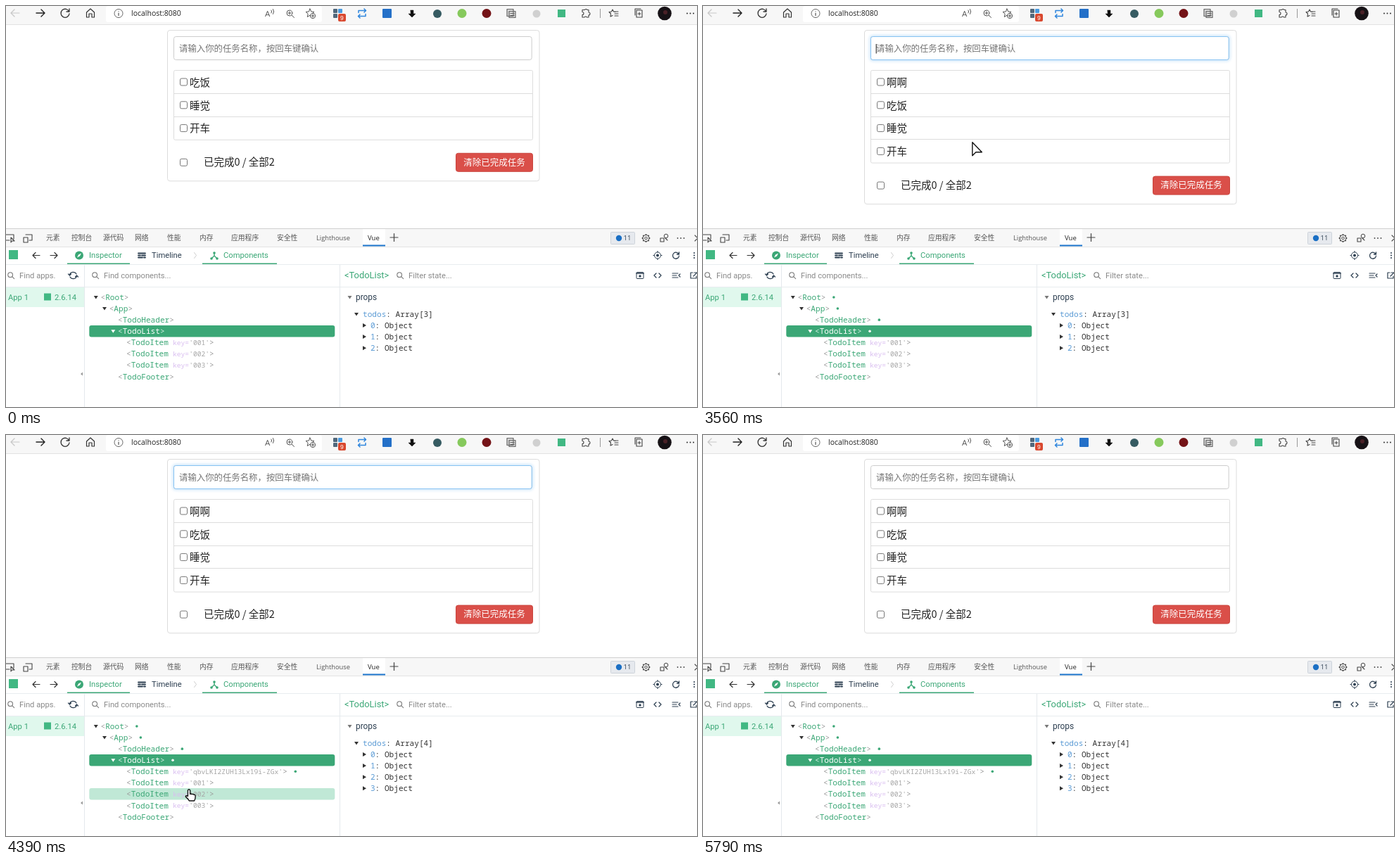
These frames come from a looping animation (982x570 px, 5870 ms). An HTML page:

```html
<!DOCTYPE html>
<html lang="zh">
<head>
<meta charset="utf-8">
<title>Todo list</title>
<style>
html,body{margin:0;width:100%;height:100%;overflow:hidden;background:#fff}
svg{display:block;width:982px;height:570px}
text{white-space:pre}
.cjk{font-family:"Noto Sans CJK SC","Noto Sans CJK",sans-serif}
.ui{font-family:"Open Sans","Noto Sans",sans-serif}
.rob{font-family:Roboto,sans-serif}
.mono{font-family:"Noto Sans Mono","DejaVu Sans Mono",monospace}
.lib{font-family:"Liberation Mono",monospace}
.sans{font-family:"Liberation Sans",sans-serif}
</style>
</head>
<body>
<svg id="stage" viewBox="0 0 982 570">
<defs><filter id="blur" x="-5%" y="-50%" width="110%" height="200%"><feGaussianBlur stdDeviation="2"/></filter></defs>
<g id="base"></g><g id="page"></g><g id="tree"></g><g id="over"></g><g id="pointer"></g>
</svg>
<script>
const LOOP = 5870, GREEN = '#3ba776', INK = '#2c3e50';
const $ = id => document.getElementById(id);
const esc = s => s.replace(/&/g, '&amp;').replace(/</g, '&lt;');

// y is the middle of the capitals
const text = (x, y, s, size, fill = '#222', font = 'cjk', more = '') =>
  `<text x="${x}" y="${y + size * .365}" font-size="${size}" fill="${fill}" class="${font}" ${more}>${esc(s)}</text>`;
const rect = (x, y, w, h, fill, stroke = 'none', r = 0, more = '') =>
  `<rect x="${x}" y="${y}" width="${w}" height="${h}" fill="${fill}" stroke="${stroke}" rx="${r}" ${more}/>`;
const dot = (x, y, r, fill, stroke = 'none') =>
  `<circle cx="${x}" cy="${y}" r="${r}" fill="${fill}" stroke="${stroke}"/>`;
const icon = (x, y, d, color = '#444', w = 1.2, fill = 'none') =>
  `<path transform="translate(${x} ${y})" d="${d}" fill="${fill}" stroke="${color}" stroke-width="${w}" stroke-linecap="round" stroke-linejoin="round"/>`;
const hline = (x, y, w, c) => rect(x, y, w, 1, c);
const down = (x, y, c) => icon(x, y, 'M-3 -2H3L0 2.5Z', 'none', 0, c);
const right = (x, y, c) => icon(x, y, 'M-2 -3V3L3 0Z', 'none', 0, c);

const ARROW_L = 'M6 0H-6M-1 -5L-6 0L-1 5', ARROW_R = 'M-6 0H6M1 -5L6 0L1 5';
const RELOAD = 'M5.6 -2A6 6 0 1 0 6 1M6 -6V-2H2';
const LENS = 'M3 -1A4 4 0 1 1 -5 -1A4 4 0 1 1 3 -1M2 2L5.5 5.5';
const STAR = 'M0 -6L1.8 -2L6 -1.6L2.8 1.2L3.7 5.5L0 3.2L-3.7 5.5L-2.8 1.2L-6 -1.6L-1.8 -2Z';
const scale = (s, x, y, html) => `<g transform="translate(${x} ${y}) scale(${s})">${html}</g>`;

function browserBar() {
  return rect(0, 0, 982, 26, '#f7f7f7') + rect(142, 0, 307, 23, '#fff', 'none', 3) + hline(0, 26, 982, '#e2e2e2') +
    icon(13, 10, ARROW_L, '#c8c8c8') + icon(49, 10, ARROW_R, '#222', 1.4) +
    icon(84, 10, RELOAD, '#333', 1.3) +
    icon(120, 10, 'M-5.5 -1L0 -6L5.5 -1V6H2V1H-2V6H-5.5Z', '#333') +
    dot(160, 10.5, 6, 'none', '#666') + icon(160, 10, 'M0 0V3.5M0 -2.5V-2.4', '#555') +
    text(178, 10.5, 'localhost:8080', 10.5, '#222', 'ui') +
    text(368, 11, 'A', 11.5, '#555', 'ui') + icon(377, 8, 'M0 -2Q1.5 0 0 2M2.5 -3.5Q5 0 2.5 3.5', '#555', 1) +
    icon(404, 11, LENS + 'M-3 -1H1M-1 -3V1', '#555', 1) +
    icon(432, 10, STAR, '#555', 1) + dot(436, 14, 3.6, '#fff', '#555') + icon(436, 14, 'M-2 0H2M0 -2V2', '#555', 1) +
    rect(465, 4, 6, 6, '#51687c', 'none', 1) + rect(472, 4, 6, 6, '#4a9be0', 'none', 1) + rect(465, 11, 6, 6, '#51687c', 'none', 1) +
    rect(472, 11, 11, 11, '#d9482f', 'none', 2) + text(475, 16.7, '9', 8.5, '#fff', 'sans') +
    icon(506, 10.5, 'M-5 -1V-4H5M3 -6.5L5.5 -4L3 -1.5M5 1V4H-5M-3 6.5L-5.5 4L-3 1.5', '#2f86dd', 1.5) +
    rect(535, 4, 13, 13, '#2470c8', 'none', 1) +
    icon(577, 11, 'M-2 -5H2V0H5L0 5L-5 0H-2Z', '#111', .5, '#111') +
    dot(613, 11, 6, '#365b62') + dot(648, 10.5, 6.5, '#86c95c') + dot(683, 10.5, 6.5, '#741317') +
    icon(718, 10.5, 'M-6 -6H3V4H-6ZM-3 -3H6V6H-3ZM-1 0H4M-1 3H4', '#666', 1.2, '#d8d8d8') +
    dot(754, 11, 5.5, '#d0d0d0') + rect(784, 5, 11, 11, '#41b883') +
    icon(824, 10.5, 'M-5 -5H-1.5A2 2 0 0 1 2 -5H4V-1.5A2 2 0 0 1 4 2.5V5.5H1.5A2 2 0 0 0 -2 5.5H-5V2A2 2 0 0 0 -5 -2Z', '#444', 1.1) +
    rect(844, 4, 1, 13, '#999') +
    icon(863, 10, 'M-1 -5L.5 -2L3 -1.6M-1 -5L-2.5 -2L-6 -1.5L-3.5 1L-4 5L-1 3.4M2 1H7M1 -2H7M2 4H7', '#444', 1.1) +
    icon(899, 10, 'M-5 3V-6H3M-3 -4H5V6H-3ZM-1 1H3M1 -1V3', '#444', 1.1) +
    dot(936, 10.5, 9.8, '#171216') + dot(937, 9, 3, '#4a2027') +
    [968, 972.5, 977].map(x => dot(x, 10.5, 1, '#333')).join('');
}

function devtoolsBar() {
  const tabs = [[57, '元素'], [93, '控制台'], [138, '源代码'], [183, '网络'], [229, '性能'], [275, '内存'], [320, '应用程序'], [385, '安全性']];
  return rect(0, 316, 982, 26, '#f7f7f7') + hline(0, 316, 982, '#d0d0d0') +
    icon(5, 329, 'M-6 -4H6V2M-6 4H0M2 0L7 5H3.5L2 7Z', '#444', 1.1) +
    icon(31, 330, 'M-3 -5H6V3H2M-6 -1H0V6H-6Z', '#444', 1.1) +
    tabs.map(([x, s]) => text(x, 329.5, s, 9.8, '#555')).join('') +
    text(441, 329.5, 'Lighthouse', 9.3, '#555', 'ui') +
    rect(507, 317, 32, 25, '#fff') + rect(507, 339.5, 32, 2, '#1a73c9') + text(514, 329.5, 'Vue', 9.5, '#222', 'ui') +
    icon(551.5, 329, 'M-5.5 0H5.5M0 -5.5V5.5', '#444') +
    rect(859.5, 321.5, 34, 17, '#e6e9ee', '#cdd3da', 1) + dot(871, 330, 4.2, '#1a6fc4') + text(877.5, 330, '11', 9.5, '#345', 'ui') +
    dot(909.5, 330, 4.5, 'none', '#444') + dot(909.5, 330, 1.8, 'none', '#444') +
    Array.from({length: 8}, (_, i) => `<path d="M909.5 324.2V325.8" stroke="#444" stroke-width="1.8" transform="rotate(${i * 45} 909.5 330)"/>`).join('') +
    dot(938, 327, 2.8, 'none', '#444') + icon(934, 331, 'M-4 -1H1V4H-4ZM3 -1L6 2', '#444', 1.1) +
    [954.5, 959, 963.5].map(x => dot(x, 330, .9, '#444')).join('') +
    icon(981, 330, 'M-2 -4L2 0L-2 4', '#444', 1.1);
}

function vueBar() {
  return hline(0, 342, 982, '#e4e4e4') + rect(4, 347, 13, 13, '#41b883') +
    icon(43, 354.5, 'M5 0H-5M-1 -4L-5 0L-1 4', '#333') + icon(68, 354.5, 'M-5 0H5M1 -4L5 0L1 4', '#333') +
    dot(104, 354.5, 6, GREEN) + icon(104, 354.5, 'M3 -3L1 1L-3 3L-1 -1Z', 'none', 0, '#fff') +
    text(118, 354, 'Inspector', 11.2, GREEN, 'rob') +
    icon(193, 354.5, 'M-5 -3H5M-5 0H-2M0 0H5M-5 3H1M3 3H5', INK, 1.8) + text(207, 354, 'Timeline', 11.2, INK, 'rob') +
    icon(269, 354.5, 'M-1.5 -4L1.5 0L-1.5 4', '#ccc', 1) +
    icon(296, 355, 'M0 -4V0L-4 4M0 0L4 4', GREEN, 1.4) + dot(296, 351, 1.8, GREEN) + dot(292, 359, 1.8, GREEN) + dot(300, 359, 1.8, GREEN) +
    text(309, 354, 'Components', 11.2, GREEN, 'rob') +
    hline(0, 367, 982, '#e8ecef') + rect(87, 365.5, 89, 1.5, GREEN) + rect(279, 365.5, 106, 1.5, GREEN) +
    dot(926, 354.5, 4.5, 'none', INK) + dot(926, 354.5, 2, INK) + icon(926, 354.5, 'M-6 0H-5M5 0H6M0 -6V-5M0 5V6', INK) +
    scale(.75, 952, 354.5, icon(0, 0, RELOAD, INK, 1.7)) +
    [351, 354.5, 358].map(y => dot(978, y, 1, INK)).join('');
}

function panels() {
  const lens = x => scale(.85, x, 383, icon(0, 0, LENS, '#777', 1.2));
  return lens(7) + text(19, 383, 'Find apps.', 11.2, '#8a8a8a', 'rob') +
    icon(95.5, 383, 'M-5 -1A5 4.5 0 0 1 4.5 -2M5 1A5 4.5 0 0 1 -4.5 2M-7 -2L-5 0L-3 -2M7 2L5 0L3 2', INK, 1.2) +
    lens(127) + text(139, 383, 'Find components...', 11.2, '#8a8a8a', 'rob') +
    text(481, 382.5, '<TodoList>', 12.9, GREEN, 'rob') +
    lens(560) + text(572, 383, 'Filter state...', 11.2, '#8a8a8a', 'rob') +
    rect(896, 378.5, 10, 9, 'none', INK, 1) + icon(901, 380, 'M-5 0H5', INK, 1.6) + dot(901, 384, 1.7, INK) +
    icon(926, 383, 'M-2 -3L-5 0L-2 3M2 -3L5 0L2 3', INK, 1.3) +
    icon(952, 383, 'M-5 -3H3M-5 0H1M-5 3H3M6 -2L4 0L6 2', INK, 1.2) +
    icon(977, 383, 'M-1 -4H-4V4H4V1M1 -4H5M5 -4L0 1', INK, 1.2) +
    hline(0, 399, 982, '#e8ecef') + rect(0, 400, 111, 28, '#e0f8ed') +
    text(3, 413.5, 'App 1', 11.2, GREEN, 'rob') + rect(54, 408.5, 10, 10, '#41b883') + text(69, 413.5, '2.6.14', 11.2, GREEN, 'rob') +
    rect(111, 368, 1, 202, '#e4e9ec') + rect(474, 368, 1, 202, '#e4e9ec') +
    icon(108, 523, 'M1 -2.5V2.5L-2 0Z', 'none', 0, '#999') +
    down(488.5, 414, '#777') + text(497, 413.5, 'props', 11.9, INK, 'rob');
}

const rowY = i => 91.5 + 32.8 * i;
const checkbox = y => rect(247.5, y - 5, 10, 10, '#fff', '#767676', 2);

function pageView(s) {
  const items = (s.added ? ['啊啊'] : []).concat('吃饭', '睡觉', '开车'), n = items.length;
  const end = rowY(n) + .4, foot = end + 32;
  const field = (fill, stroke, more) => rect(238.5, 43.5, 508.7, 33, fill, stroke, 3, more);
  return rect(229.5, 34.5, 528.5, end + 24, 'none', '#dcdcdc', 3.5) +
    field('#fff', '#ccc') +
    (s.focus ? `<g opacity="${s.focus}">` + field('none', '#52a8ec', 'stroke-width="3" filter="url(#blur)" opacity=".4"') + field('#fff', '#86c2f2') + '</g>' : '') +
    (s.typed ? text(246, 60.3, '啊啊', 12.4, '#555') : text(246, 60.3, '请输入你的任务名称，按回车键确认', 12.4, '#757575')) +
    (s.caret ? rect(s.typed ? 271 : 245.7, 54, 1, 13.5, '#111') : '') +
    rect(238.5, 91.5, 510, end - 91.5, '#fff', '#ddd', 2) +
    items.map((name, i) => (i ? hline(239, Math.round(rowY(i) - .5), 509, '#ddd') : '') +
      checkbox(rowY(i) + 16.5) + text(261, rowY(i) + 17, name, 14.5)).join('') +
    checkbox(foot) + text(281, foot - .2, '已完成0 / 全部2', 14.5) +
    rect(639.5, foot - 13, 109, 26, '#da4f49', '#c9443d', 3) + text(650.3, foot - .3, '清除已完成任务', 12.5, '#fff');
}

// row: indent, name, key, has arrow, dot shown
function rowsOf(s) {
  const item = (key, mark) => [171, 'TodoItem', key, 0, mark];
  return [[134.5, 'Root', '', 1, s.marks > 0], [146.7, 'App', '', 1, s.marks > 0], [159, 'TodoHeader', '', 0, s.marks > 0],
    [159, 'TodoList', '', 1, s.marks > 1], ...(s.synced ? [item('qbvLKI2ZUH13Lx19i-ZGx', true)] : []),
    item('001'), item('002'), item('003'), [159, 'TodoFooter', '', 0]];
}
const TREE_TOP = 406, STEP = 16.07;

function treeView(s) {
  const M = 11.1, W = 6.67, K = 9.65, KW = 5.79;
  const tree = rowsOf(s).map(([x, name, key, open, mark], i) => {
    const y = TREE_TOP + 8 + i * STEP, on = i === 3;
    const c = on ? '#fff' : GREEN, br = on ? '#d5f0e3' : '#9a9a9a';
    const keyX = x + (name.length + 2) * W - .7;
    const end = key ? keyX + (key.length + 6) * KW : x + (name.length + 1) * W;
    return (on || s.hover === i ? rect(118.3, Math.round(y - 8), 349, 16.4, on ? GREEN : '#c0e8d6', 'none', 3) : '') +
      (open ? down(x - 6.7, y, on ? '#fff' : '#333') : '') +
      text(x, y, '<', M, br, 'mono') + text(x + W, y, name, M, c, 'mono') +
      (key ? text(keyX, y, 'key=', K, '#d9bdf0', 'mono') + text(keyX + 4 * KW, y, `'${key}'`, K, '#a5a5a5', 'mono') : '') +
      text(end, y, '>', M, br, 'mono') + (mark ? dot(end + 18, y, 1.8, c) : '');
  }).join('');
  const n = s.synced ? 4 : 3, blue = '#5b9bd5';
  const state = down(498, 438, '#333') + text(507, 438, 'todos', M, blue, 'mono') + text(540.3, 438, `: Array[${n}]`, M, '#333', 'mono') +
    Array.from({length: n}, (_, i) => {
      const y = 454 + i * 16.1;
      return right(509, y, '#333') + text(518, y, '' + i, M, blue, 'mono') + text(524.6, y, ': Object', M, '#333', 'mono');
    }).join('');
  return tree + state;
}

function highlight(s) {
  const i = s.lit;
  if (i < 0 || i > 7) return '';
  const [x, y, w, h, name, size] = i < 2 ? [0, 34, 982, 248] : i === 2 ? [238.5, 43.5, 509, 33.5]
    : i === 3 ? [238.5, 91.5, 511, 131.7, 'TodoList', '148.95'] : [238.5, rowY(i - 4), 510.5, 33.2, 'TodoItem', '36.99'];
  let out = rect(x, y, w, h, 'rgba(65,184,131,.35)', 'none', 2);
  if (name) {
    const m = y - 12.5;
    out += rect(x, y - 23, 128 + 6 * size.length, 20.5, '#fff', '#93d6b8', 2) +
      text(246, m, '<', 10.3, '#888', 'lib') + text(252.2, m, name, 10.3, '#1f9a66', 'lib', 'font-weight="bold"') + text(301.7, m, '>', 10.3, '#888', 'lib') +
      text(313, m, i === 3 ? '578.01' : '576.02', 10, '#888', 'lib') + icon(353.5, m + .5, 'M-2.5 -2.5L2.5 2.5M2.5 -2.5L-2.5 2.5', '#999', 1) +
      text(358.5, m, size, 10, '#888', 'lib');
  }
  return out;
}

const POPUPS = {
  1: ['a', 275, '啊 阿 吖 A 嗄 锕 腌', 1],
  2: ['aa', 279, '啊 阿 吖 AA 嗄 锕 腌', 1],
  3: ["a'a", 317, '啊啊 阿啊 啊阿 啊 阿 AA 吖', 0]
};
function popup(n) {
  if (!n) return '';
  const [typed, w, words, hint] = POPUPS[n], r = 244 + w, bold = 'font-weight="bold"';
  const spans = words.split(' ').map((s, i) => `<tspan${i ? ' dx="9"' : ''} fill="${i ? '#0a7bd6' : '#f04020'}">${i + 1}.${s}</tspan>`).join('');
  return rect(244.5, 67.5, w - 1, 49, '#f9fcff', '#a9bccb') + hline(250, 90, w - 31, '#cfd9e2') +
    text(252.5, 79, typed, 12.8, '#0c62c0', 'sans', bold) +
    rect(253 + (n === 3 ? 17 : typed.length * 7.2), 72, 1, 14, '#333') +
    (hint ? text(298.5, 79, '[a]', 12.5, '#f0501c', 'sans', bold) : '') +
    `<text x="252" y="108" font-size="12.3" class="cjk">${spans}</text>` +
    rect(r - 47.5, 98.5, 10.5, 10, '#fff', '#c8d9e6') + rect(r - 37, 98.5, 11, 10, '#fff', '#c8d9e6') +
    icon(r - 42.5, 103.5, 'M1.5 -2V2L-1.5 0Z', 'none', 0, '#8bbbe0') + icon(r - 31.5, 103.5, 'M-1.5 -2.5V2.5L2 0Z', 'none', 0, '#0a6fc4') +
    dot(r - 12, 80, 11.5, '#f2724e');
}

// steps of [time, value]
const at = (steps, t) => steps.reduce((v, [k, x]) => t >= k ? x : v, 0);
const POPUP = [[1210, 1], [1440, 2], [1630, 3], [2460, 0]];
const MARKS = [[2560, 1], [3210, 2]];
const CARET = [[740, 1], [1240, 0], [1755, 1], [2258, 0], [2460, 1], [2910, 0], [3410, 1], [3910, 0], [4410, 1], [4910, 0], [5410, 1], [5790, 0]];
const FOCUS = [[720, .35], [780, .7], [840, 1], [5790, 0]];
const PATH = [[30, 930, 556], [250, 560, 212], [420, 350, 78], [500, 320.5, 60], [2800, 320.5, 60], [2970, 334, 60], [3180, 334, 60],
  [3320, 347, 85], [3560, 383, 193], [3740, 350, 340], [3790, 290, 410], [3860, 240, 428], [3930, 190, 455], [4010, 181, 466],
  [4060, 182, 468], [4330, 257, 500], [4390, 260, 503.5], [4600, 270, 506], [4700, 285, 501], [4930, 318, 484],
  [5080, 323, 478], [5200, 332, 478], [5490, 805, 570]];

function pointerAt(t) {
  const i = PATH.findIndex(p => p[0] > t);
  if (i < 1) return null;
  const [a, x, y] = PATH[i - 1], [b, u, v] = PATH[i], k = (t - a) / (b - a);
  return [x + (u - x) * k, y + (v - y) * k];
}
function rowAt(t) {
  const p = pointerAt(t);
  if (!p || p[0] < 118 || p[0] > 467 || p[1] < TREE_TOP) return -1;
  const i = Math.floor((p[1] - TREE_TOP) / STEP);
  return i < 9 ? i : -1;
}

const SHAPES = {
  arrow: icon(0, 0, 'M0 0V19L5 14H13.5Z', '#111', 1.4, '#fff'),
  beam: icon(0, 0, 'M-3 -7.5H-1L0 -6.5L1 -7.5H3M0 -6.5V6.5M-3 7.5H-1L0 6.5L1 7.5H3', '#111', 1.7),
  hand: icon(0, 0, 'M-1.6 1.4Q0 -1 1.6 1.4V7Q3.2 5.8 4.3 7.2Q6 6.2 6.9 7.8Q9 7.2 9 9.5V12Q8.8 14.5 7.4 16.5H.3Q-1 13.8 -4.8 10.6Q-4.6 8.2 -1.6 10Z', '#111', 1.4, '#fff')
};

const shown = {};
function put(id, key, draw) {
  if (shown[id] === key) return;
  shown[id] = key;
  $(id).innerHTML = draw();
}

function render(t) {
  const hover = rowAt(t), p = pointerAt(t);
  const s = {
    added: t >= 3180, typed: t >= 2460 && t < 3180, synced: t >= 3780,
    focus: at(FOCUS, t), caret: at(CARET, t), marks: at(MARKS, t),
    hover, lit: rowAt(t - 30) === hover ? hover : -1, popup: at(POPUP, t)
  };
  put('page', [s.added, s.typed, s.focus, s.caret].join(), () => pageView(s));
  put('tree', [s.synced, s.marks, s.hover].join(), () => treeView(s));
  put('over', [s.lit, s.popup].join(), () => highlight(s) + popup(s.popup));
  const inField = p && p[0] > 239 && p[0] < 748 && p[1] > 43 && p[1] < 77;
  const kind = !p ? '' : inField ? 'beam' : hover >= 0 ? 'hand' : 'arrow';
  put('pointer', kind, () => SHAPES[kind] || '');
  if (p) $('pointer').setAttribute('transform', `translate(${p[0]} ${p[1]})`);
}

$('base').innerHTML = browserBar() + devtoolsBar() + vueBar() + panels();
const start = performance.now();
function frame() {
  render((performance.now() - start) % LOOP);
  requestAnimationFrame(frame);
}
frame();
</script>
</body>
</html>
```
